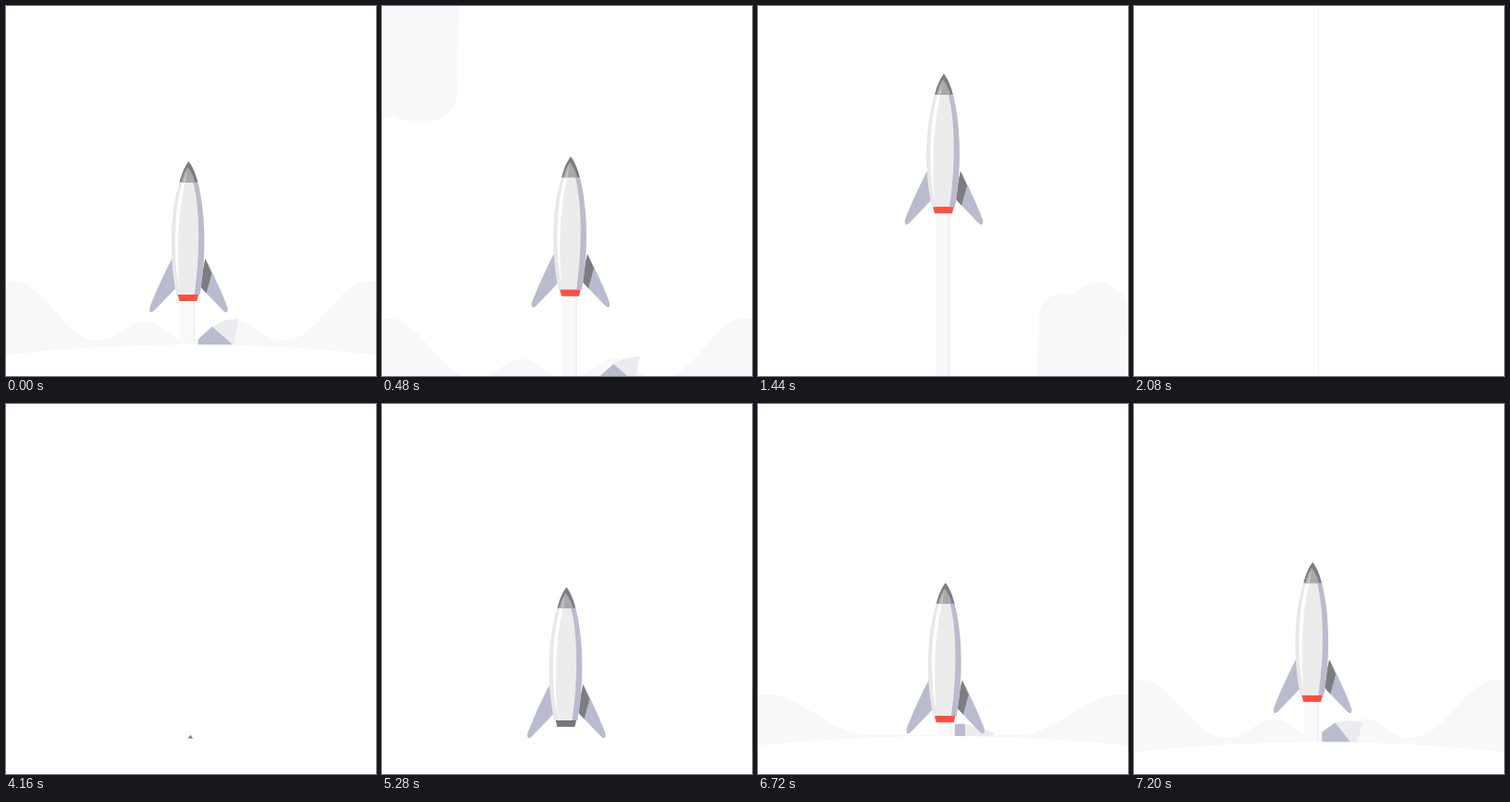
An HTML page with a canvas for the animation above (7240 ms loop, 400 px wide and 400 px high).

```html
<!DOCTYPE html>
<html lang="en">
<head>
<meta charset="utf-8">
<title>Rocket launch</title>
<style>
html, body { margin: 0; width: 100%; height: 100%; overflow: hidden; background: #fff; }
canvas { display: block; width: 100vmin; height: 100vmin; }
</style>
</head>
<body>
<canvas id="stage" width="400" height="400"></canvas>
<script>
const ctx = document.getElementById('stage').getContext('2d');
const LOOP = 7240, APPEAR = 4160, IGNITE = 5280, GONE = 1720;
const LILAC = '#babbcd', PALE = '#f8f8f8', GRAY = '#7d7d81';
const MID = 199.4;

const clamp = (v, a = 0, b = 1) => Math.min(b, Math.max(a, v));
const mix = (a, b, k) => a + (b - a) * k;
const part = (t, a, b) => clamp((t - a) / (b - a));
const inOut = p => p < .5 ? 2 * p * p : 1 - 2 * (1 - p) * (1 - p);
const bump = (x, center, span) => (1 + Math.cos(Math.PI * clamp((x - center) / span, -1, 1))) / 2;

function fill(path, color) {
  ctx.fillStyle = color;
  ctx.fill(typeof path === 'string' ? new Path2D(path) : path);
}

function polygon(points, color) {
  const path = new Path2D();
  points.forEach(p => path.lineTo(...p));
  path.closePath();
  fill(path, color);
}

// Rocket drawn with its nose at (200, 198).
const BODY = 'M200 198 C206 206 208 214 210 221 C219 256 219 305 212 342 L187 342 C179 305 179 256 190 221 C192 214 194 206 200 198Z';
const EDGE = 'M178 221 L193 221 C183 256 184 305 190 343 L178 343Z';
const SHADE = 'M200 198 L220 198 L220 343 L206 343 C212 305 213 250 205 221Z';
const SHINE = 'M193 221 L196 221 C188 256 187 300 190 336 C184 305 183 256 193 221Z';
const NOSE_LIGHT = 'M199 204 C196 209 193 215 192 220.5 L207 220.5 C205 213 202 208 199 204Z';
const FIN = 'M182 303 C174 318 163 342 158 356 C157 361 159 363 163 359 L188 333Z';
const FIN_SHADE = 'M182 303 L175 319 L181 341 L190 330Z';

function fin(side, angle) {
  ctx.save();
  if (side > 0) {
    ctx.translate(400, 0);
    ctx.scale(-1, 1);
  }
  ctx.translate(183, 305);
  ctx.rotate(angle);
  ctx.translate(-183, -305);
  fill(FIN, LILAC);
  if (side > 0) {
    ctx.clip(new Path2D(FIN));
    fill(FIN_SHADE, GRAY);
  }
  ctx.restore();
}

function rocket(dx, dy, spread, heat) {
  ctx.save();
  ctx.translate(MID - 200 + dx, dy);
  fin(-1, spread);
  fin(1, spread);
  const rgb = [mix(119, 250, heat), mix(120, 82, heat), mix(125, 68, heat)];
  polygon([[188, 341], [211, 341], [209, 349], [190, 349]], `rgb(${rgb.map(Math.round)})`);
  ctx.clip(new Path2D(BODY));
  fill(BODY, '#ececec');
  fill(EDGE, '#e8e8eb');
  fill(SHADE, LILAC);
  fill(SHINE, '#fff');
  ctx.fillStyle = GRAY;
  ctx.fillRect(180, 190, 40, 30.5);
  fill(NOSE_LIGHT, '#a9a9ac');
  fill('M198 207 L194 220.5 L197 220.5Z', '#c6c6c9');
  ctx.restore();
}

// Two swells on each side, mirrored about the middle, over a bowed ground line.
function dust(grow, ground, drop) {
  const path = new Path2D();
  const tall = 64 * grow, span = mix(160, 88, grow);
  const low = 20 * part(grow, .7, .97);
  for (let x = 0; x <= 400; x += 4) {
    const d = Math.abs(x - 200);
    path.lineTo(x, ground - 5 * grow ** 4 - tall * bump(d, 192, span) - low * bump(d, 50, 45) + drop);
  }
  const edge = 362 + 15 * grow ** 2;
  path.lineTo(400, edge + drop);
  path.quadraticCurveTo(200, 2 * ground - edge + drop, 0, edge + drop);
  path.closePath();
  fill(path, PALE);
}

// A tumbling lump beside the exhaust: roll tips its crest from left to right.
function puff(x, ground, grow) {
  const roll = grow ** 12, tall = 28 * grow ** 2;
  const at = (px, py) => [x + 44 * px, ground - tall * py];
  const crest = at(.25 + .1 * roll, 1 - .3 * roll);
  const corner = at(.25 + .6 * roll, 0);
  polygon([crest, at(.62, .7 + .22 * roll), at(1, .2 + .8 * roll), at(.87, 0), corner], '#ececf0');
  polygon([at(0, 0), at(0, 1 - .8 * roll), crest, corner], LILAC);
}

function trail(x, top, bottom, width) {
  if (bottom <= top) return;
  const rim = Math.min(2, width);
  ctx.fillStyle = '#f9f9f9';
  ctx.fillRect(x - width / 2, top, width, bottom - top);
  ctx.fillStyle = '#f1f1f1';
  ctx.fillRect(x + width / 2 - rim, top, rim, bottom - top);
}

function cloud(x, y, lobes) {
  const path = new Path2D();
  for (const [lx, ly, w, h, r] of lobes) path.roundRect(lx, ly, w, h, r);
  ctx.save();
  ctx.transform(1, 0, -.02, 1, x, y);
  fill(path, PALE);
  ctx.restore();
}

function clouds(t) {
  const fall = (t - 1000) * .6;
  cloud(304, 35 + fall, [[0, 12, 52, 114, 25], [32, 0, 64, 127, 32]]);
  cloud(-45, 254 + fall, [[0, 0, 90, 180, 45], [50, 32, 79, 150, 28]]);
}

function rise(t) {
  const hidden = 163 * (1 - inOut(part(t, 4080, 4880)));
  const spread = .42 * Math.sin(Math.PI * part(t, 4400, 4880));
  ctx.save();
  ctx.beginPath();
  ctx.rect(0, 0, 400, 361.5);
  ctx.clip();
  rocket(0, hidden, spread, 0);
  ctx.restore();
}

// u is the time since ignition.
function launch(u) {
  const grow = part(u, 300, 1960);
  const ground = 357 + 9 * grow ** 4;
  const drop = 150 * part(u, 2040, 2810) ** 2;
  const shake = 6.3 * Math.min(part(u, 600, 1920), 1 - .7 * part(u, 2300, 3300));
  const dx = -shake * Math.cos((u - 1920) * Math.PI / 100);
  const hover = Math.min(35.3, 30 * part(u, 960, 2960) ** 2.5 * 2 ** 2.5);
  const climb = 1.05e-6 * Math.max(0, u - 2960) ** 3;
  const dy = -hover - climb;

  if (grow > 0) {
    dust(grow, ground, drop);
    if (u > 1960) clouds(u + IGNITE - LOOP);
    trail(MID - 1 + dx, 349 + dy, drop < 150 ? ground + drop : 400, 16);
    puff(209.5 + dx + 26 * part(u, 1960, 2560), ground + drop, grow);
  }
  rocket(dx, dy, 0, part(u, 240, 520));
}

function draw(t) {
  ctx.fillStyle = '#fff';
  ctx.fillRect(0, 0, 400, 400);
  if (t < GONE || t >= IGNITE) launch((t - IGNITE + LOOP) % LOOP);
  else if (t < APPEAR) trail(199.5, 0, 400, mix(16, 1, part(t, GONE, 2080)));
  else rise(t);
}

const start = performance.now();
function tick() {
  const t = (performance.now() - start) % LOOP;
  draw(Math.floor(t / 40) * 40);
  requestAnimationFrame(tick);
}
tick();
</script>
</body>
</html>
```
